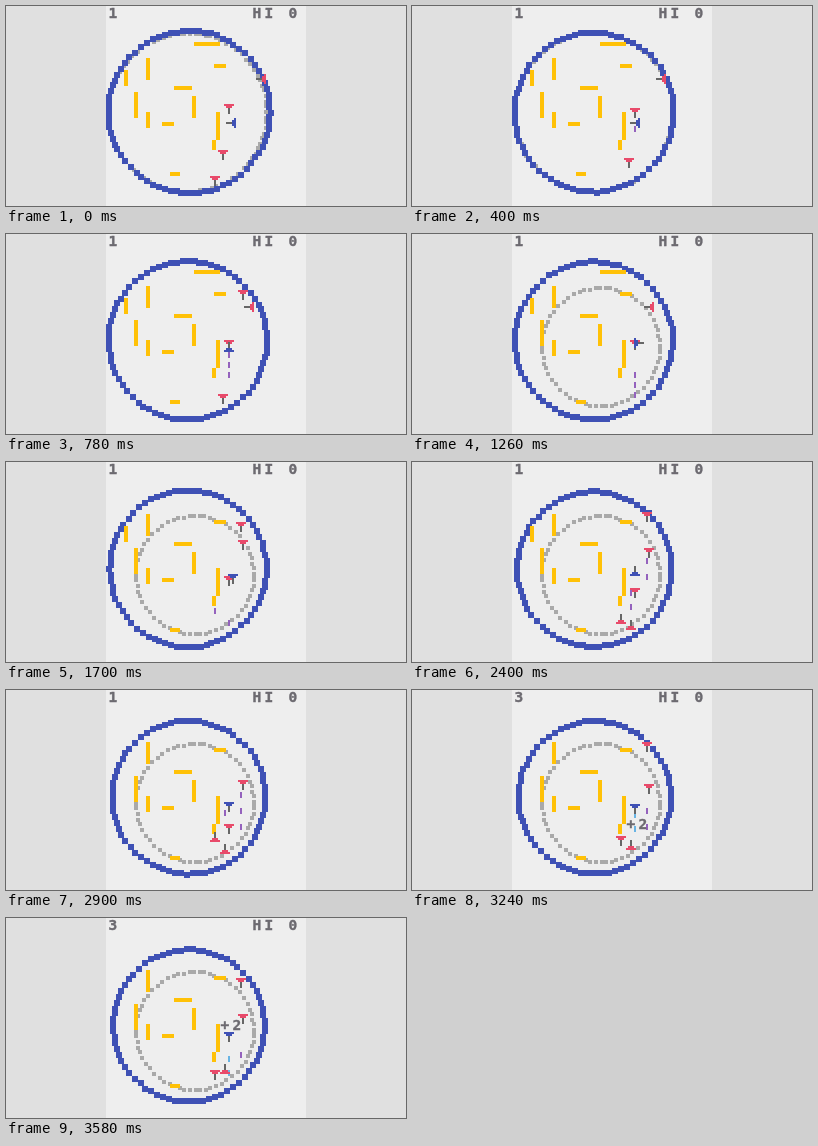
Write an HTML page that moves like this. It is 400 by 200 pixels and loops after 3600 ms.

```html
<!DOCTYPE html>
<html lang="en">
<head>
<meta charset="utf-8">
<title>Shrinking arena</title>
<style>
html, body { margin: 0; width: 100%; height: 100%; overflow: hidden; background: #e0e0e0; }
svg { display: block; width: 100vw; height: 100vh; }
text {
  font: bold 14.5px "DejaVu Sans Mono", monospace; letter-spacing: 3.27px;
  fill: #6c6a70; stroke: #6c6a70; stroke-width: .4px; white-space: pre;
}
#game { filter: blur(.6px); }
</style>
</head>
<body>
<svg viewBox="0 0 400 200">
  <rect width="400" height="200" fill="#e0e0e0"/>
  <rect x="100" width="200" height="200" fill="#eee"/>
  <g id="game">
    <path id="zone" fill="#a9a9a9"/>
    <path id="arena" fill="#3f51b5"/>
    <g id="walls" fill="#ffc107"></g>
    <g id="shots"></g>
    <g id="units"></g>
    <text id="score" x="102.6" y="12">1</text>
    <text x="246.6" y="12">HI 0</text>
    <text id="bonus" x="214.6">+2</text>
  </g>
</svg>
<script>
const LOOP = 3600, KILL = 3200, SHOT_SPEED = 0.045;
const RED = '#e84a6a', BLUE = '#3f51b5', PURPLE = '#9462bd', CYAN = '#68b4e4', DARK = '#666';
// Facing in quarter turns from down
const DOWN = 0, LEFT = 1, UP = 2, RIGHT = 3;
const $ = id => document.getElementById(id);
const lerp = (a, b, k) => a + (b - a) * k;
const even = v => 2 * Math.round(v / 2);
const odd = v => 2 * Math.floor(v / 2) + 1;

function add(parent, tag, attrs) {
  const el = document.createElementNS('http://www.w3.org/2000/svg', tag);
  for (const k in attrs) el.setAttribute(k, attrs[k]);
  return parent.appendChild(el);
}
const show = (el, on) => el.setAttribute('visibility', on ? 'visible' : 'hidden');

// Outermost walls first: the shrinking arena drops them in this order
const wide = (x, y, width) => add($('walls'), 'rect', { x, y, width, height: 4 });
const tall = (x, y, height) => add($('walls'), 'rect', { x, y, width: 4, height });
const walls = [
  wide(188, 36, 26), tall(118, 64, 16),
  wide(208, 58, 12), wide(168, 80, 18), wide(156, 116, 12), wide(164, 166, 10),
  tall(140, 52, 22), tall(128, 86, 26), tall(186, 90, 22),
  tall(140, 106, 16), tall(210, 106, 28), tall(206, 134, 10)
];

// One straight walk, speed in px per second
function walk(color, start, end, x, y, facing, speed) {
  const el = add($('units'), 'g', {});
  add(el, 'path', { d: 'M-5-5h10v2h-2v2h-6v-2h-2z', fill: color });
  add(el, 'path', { d: 'M-1-1h2v6h-2z', fill: DARK });
  return t => {
    show(el, t >= start && t < end);
    const way = speed * (t - start) / 1000, a = facing * Math.PI / 2;
    const px = odd(x - way * Math.sin(a)), py = odd(y + way * Math.cos(a));
    el.setAttribute('transform', `translate(${px} ${py}) rotate(${facing * 90})`);
  };
}
const walks = [
  walk(RED, 0, 1400, 254, 72, LEFT, 14),
  walk(RED, 1400, LOOP, 236, 80, DOWN, 10),
  walk(RED, 450, 1100, 236, 58, DOWN, 12),
  walk(RED, 1380, 2150, 235, 62, DOWN, 12),
  walk(RED, 2200, 2600, 234, 52, DOWN, 12),
  walk(RED, 3000, LOOP, 234, 53, DOWN, 20),
  walk(RED, 0, 1250, 223, 103, DOWN, 10),
  walk(RED, 1250, KILL, 223, 111, DOWN, 17),
  walk(RED, 0, 1050, 217, 149, DOWN, 20),
  walk(RED, 0, 400, 208, 175, DOWN, 20),
  walk(RED, 1800, 3000, 208, 169, UP, 20),
  walk(RED, 3000, LOOP, 208, 147, DOWN, 17),
  walk(RED, 1800, LOOP, 218, 169, UP, 10),
  walk(BLUE, 0, 500, 224, 116, LEFT, 2),
  walk(BLUE, 500, 1100, 223, 114, UP, 5),
  walk(BLUE, 1100, 1500, 226, 109, RIGHT, 5),
  walk(BLUE, 1500, 2100, 227, 115, DOWN, 5),
  walk(BLUE, 2100, 2650, 222, 110, UP, 4),
  walk(BLUE, 2650, LOOP, 223, 116, DOWN, 4)
];

// A row of shots fired at a fixed interval
function burst(fill, start, gap, count, x, y, dir, reach) {
  const dashes = Array.from({ length: count }, () =>
    add($('shots'), 'rect', { x: x - 1, width: 2, height: 6, fill }));
  return t => dashes.forEach((el, i) => {
    const way = (t - start - i * gap) * SHOT_SPEED;
    show(el, way >= 0 && way < reach);
    el.setAttribute('y', even(y + dir * way - 3));
  });
}
const bursts = [
  burst(PURPLE, 290, 220, 3, 223, 118, 1, 48),
  burst(PURPLE, 1500, 0, 1, 209, 158, -1, 16),
  burst(PURPLE, 1822, 290, 2, 219, 158, -1, 40),
  burst(PURPLE, 2022, 340, 3, 235, 97, 1, 40),
  burst(CYAN, 2913, 311, 2, 223, 124, 1, 40)
];

// Blocks on a circle, evenly stepped along the longer axis
function ring(cx, cy, r, size, step) {
  let d = '';
  for (let a = 0; a < 2 * Math.PI;) {
    const c = Math.cos(a), s = Math.sin(a);
    const x = even(cx + r * c - size / 2), y = even(cy + r * s - size / 2);
    d += `M${x} ${y}h${size}v${size}h${-size}z`;
    a += step / r / Math.max(Math.abs(c), Math.abs(s));
  }
  return d;
}

function drawRings(t) {
  const settle = Math.min(t / 500, 1);
  const shrink = Math.max(0, t - 1000) / 2600 * 0.17;
  const cx = lerp(lerp(183.2, 181.8, settle), 189, shrink);
  const cy = lerp(lerp(106, 106.6, settle), 113, shrink);
  const r = lerp(lerp(81, 79.2, settle), 59, shrink);
  $('arena').setAttribute('d', ring(cx, cy, r, 6, 5.8));
  $('zone').setAttribute('d',
    t < 500 ? ring(181.8, 106.6, 79.2, 4, 5.2) :
    t < 1000 ? '' : ring(189, 113, 59, 4, 5.2));
}

function draw(t) {
  drawRings(t);
  walls.forEach((el, i) => show(el, t < 1500 + i * 1160 || i > 1));
  walks.forEach(f => f(t));
  bursts.forEach(f => f(t));
  const age = (t - KILL) / 1000 * 60;
  $('score').textContent = age < 0 ? '1' : '3';
  show($('bonus'), age >= 0 && age < 30);
  $('bonus').setAttribute('y', 148 - 40 * (1 - 0.9 ** Math.max(0, age)));
}

const begin = performance.now();
function tick() {
  const t = (performance.now() - begin) % LOOP;
  draw(Math.floor(t / 20) * 20);
  requestAnimationFrame(tick);
}
tick();
</script>
</body>
</html>
```
